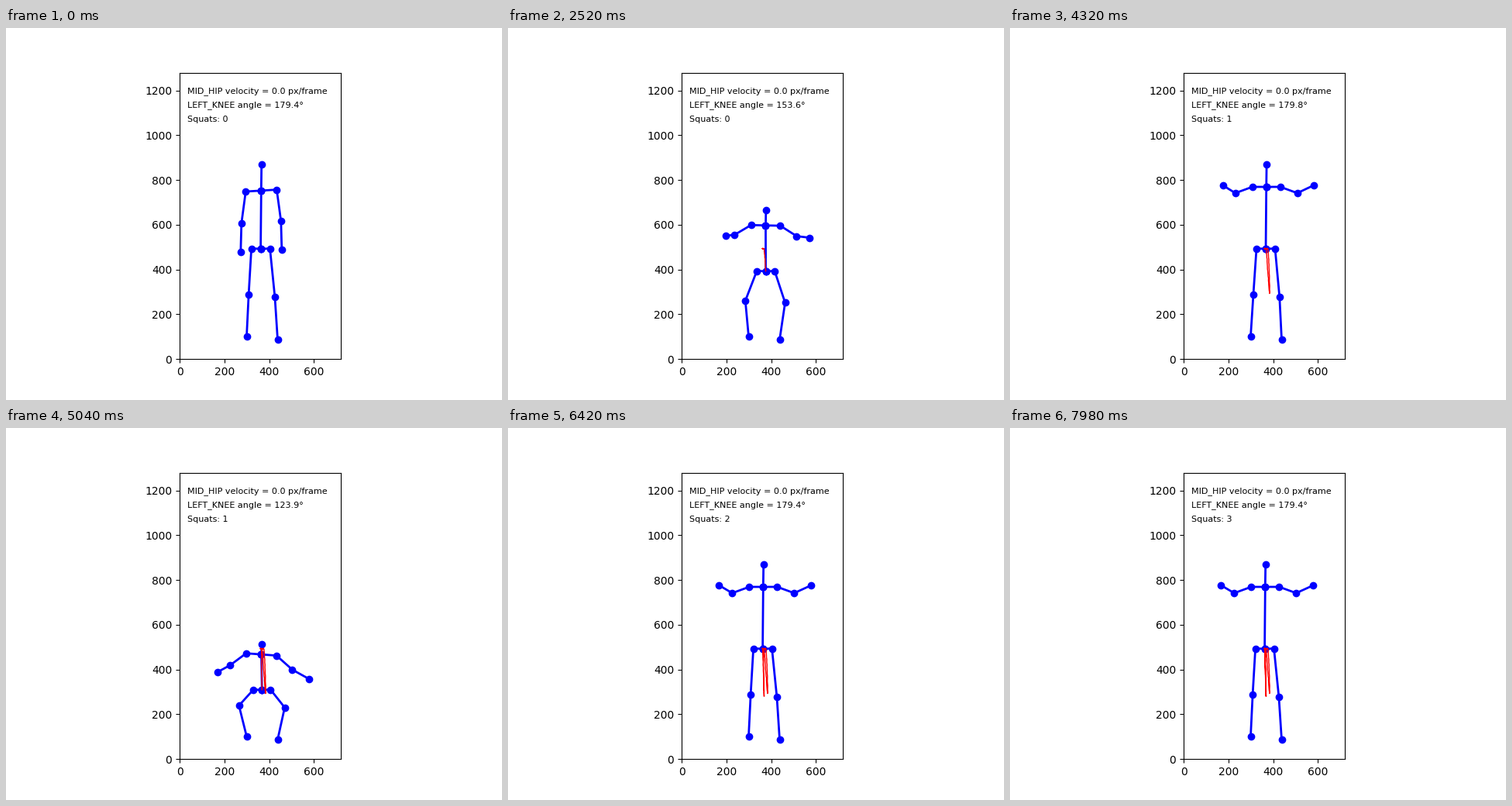
These frames come from a looping animation (640 px wide and 480 px high, 8 s). A matplotlib script:

```python
import numpy as np
import matplotlib.pyplot as plt
from matplotlib.animation import FuncAnimation

LOOP, TICK, STEP = 8000, 20, 30      # ms
STEPS = LOOP // STEP + 1
SCALE = 369.6 / 1280                 # pixels per data unit
LEFT, BOTTOM = 224.05, 427.2         # corner of the axes on the stage

# start, lowest point and end in ms, then depth
SQUATS = [(2090, 2950, 3697, 1.09), (4360, 5250, 6000, 1.15), (6500, 7150, 7800, 1.15)]


def ease(t, start, end):
    return (1 - np.cos(np.pi * np.clip((t - start) / (end - start), 0, 1))) / 2


def mix(a, b, k):
    return a + (b - a) * k


def depth(t):
    return sum(k * (ease(t, a, low) - ease(t, low, b)) for a, low, b, k in SQUATS)


def pair(cx, half, y, drop):
    """Left and right joint around cx; the right one sits lower by drop."""
    return (np.stack(np.broadcast_arrays(cx - half, y - drop / 2), -1),
            np.stack(np.broadcast_arrays(cx + half, y + drop / 2), -1))


def build(t):
    """Joint paths in stage pixels."""
    d, lead = depth(t), depth(t + 20)          # the upper body moves first
    lift = ease(t, 900, 1400)
    sway = 5 * np.exp(-((t - 3200) / 1000) ** 2)
    reach = 46 + 13.5 * (1 - np.exp(-np.clip(t - 1620, 0, None) / 1000))
    tilt = 0.075 * d ** 2 - 0.06 * (1 - lift)
    cx = 329.3 + sway

    def upper(rest_half, rest_y, half, stand_y, low_y, shift=0):
        half = mix(rest_half, half, lift)
        y = mix(rest_y, mix(stand_y, low_y, lead), lift)
        return pair(cx + shift, half, y, 2 * half * tilt)

    swing = 12 * np.sin(np.pi * lift)
    joint = {"nose": pair(cx + 0.4, 0, mix(175.5, 276.5, lead), 0)[0]}
    sides = {
        "sh": upper(20, 209.8, 18 + 1.5 * lead, 205, 290),
        "elbow": upper(25.5, 250.5, 40, 213, 306.5),
        "hand": upper(26.5, 287.5, reach + swing, 203, 316.5, 2.5 * lift),
        "hip": pair(328.6 + sway + 1.5 * d, 12 - 0.8 * d, mix(284.7, 337.8, d), 0),
        "knee": pair(330 + 0.6 * sway, 16.9 + 12.6 * d ** 0.6,
                     mix(345.7, 359.4, d), 2.5),
        "ankle": pair(330.5 + 0 * t, 20, 400, 4),
    }
    for name, (left, right) in sides.items():
        joint[name + "_l"], joint[name + "_r"] = left, right
    return joint


def bend(a, b, c):
    u, v = a - b, c - b
    cos = (u * v).sum(-1) / np.hypot(*u.T) / np.hypot(*v.T)
    return np.degrees(np.arccos(np.clip(cos, -1, 1)))


joint = build(np.arange(STEPS) * STEP)

# slight tracking noise on every other step
rng = np.random.default_rng(4)
for name, path in joint.items():
    path = path + rng.normal(0, 0.25, path.shape) * (np.arange(STEPS) % 2)[:, None]
    joint[name] = (path - [LEFT, BOTTOM]) / [SCALE, -SCALE]

joint["neck"] = (joint["sh_l"] + joint["sh_r"]) / 2
joint["hip"] = (joint["hip_l"] + joint["hip_r"]) / 2
angles = bend(joint["hip_l"], joint["knee_l"], joint["ankle_l"])

# a squat counts once the knee straightens again
counts, total, down = [], 0, False
for angle in angles:
    if angle < 130:
        down = True
    elif down and angle > 160:
        down, total = False, total + 1
    counts.append(total)

chains = [chain.split() for chain in (
    "nose neck hip",
    "neck sh_l elbow_l hand_l",
    "neck sh_r elbow_r hand_r",
    "hip hip_l knee_l ankle_l",
    "hip hip_r knee_r ankle_r",
)]

fig, ax = plt.subplots(figsize=(6.4, 4.8), dpi=100)
ax.set_xlim(0, 720)
ax.set_ylim(0, 1280)
ax.set_aspect("equal")

bones = [ax.plot([], [], "bo-", lw=2)[0] for _ in chains]
trail, = ax.plot([], [], "r-", lw=1)


def label(y, text=""):
    return ax.text(0.05, y, text, transform=ax.transAxes, fontsize=8, va="top")


label(0.95, "MID_HIP velocity = 0.0 px/frame")
knee_text = label(0.90)
count_text = label(0.85)


def draw(n):
    s = n * TICK // STEP
    for bone, chain in zip(bones, chains):
        bone.set_data(*np.array([joint[name][s] for name in chain]).T)
    trail.set_data(*joint["hip"][:s + 1].T)
    knee_text.set_text(f"LEFT_KNEE angle = {angles[s]:.1f}°")
    count_text.set_text(f"Squats: {counts[s]}")
    return [*bones, trail, knee_text, count_text]


anim = FuncAnimation(fig, draw, frames=LOOP // TICK, interval=TICK,
                     repeat=True, repeat_delay=0)
plt.show()
```
